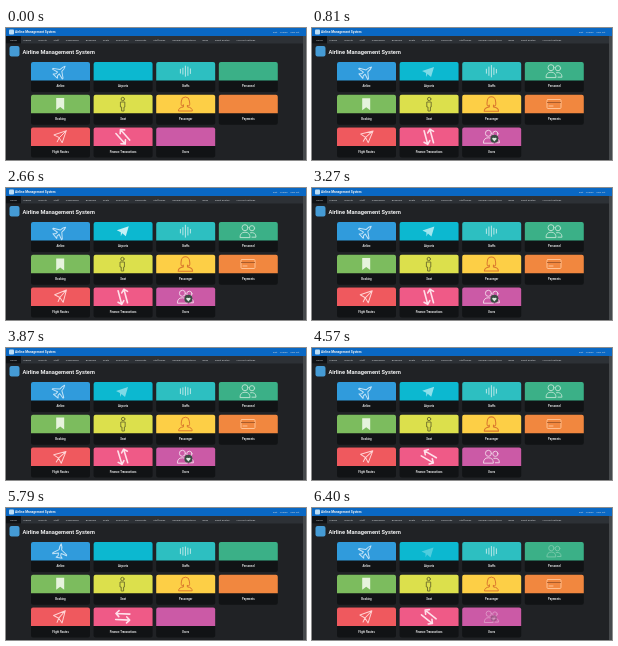
Animation, 300 px wide and 132 px high, one loop 6.5 s. Source, as an HTML page:

```html
<!DOCTYPE html>
<html lang="en">
<head>
<meta charset="utf-8">
<title>Airline Management System</title>
<style>
html, body { margin: 0; width: 100%; height: 100%; overflow: hidden; background: #202225; }
svg { display: block; width: 100vw; height: 100vh; }
text { font-family: Roboto, "Open Sans", sans-serif; fill: #d5d7da; }
.nav { font-size: 2.5px; }
.label { font-size: 2.8px; font-weight: 700; text-anchor: middle; fill: #e4e5e6; }
.heading { font-weight: 700; fill: #f0f1f2; }
.icon { fill: none; stroke-width: 1; stroke-linecap: round; stroke-linejoin: round; }
</style>
</head>
<body>
<svg viewBox="0 0 300 132" preserveAspectRatio="none">
  <rect width="300" height="132" fill="#202225"/>
  <rect width="300" height="8" fill="#0a68c4"/>
  <rect x="3" y="1.5" width="5" height="5" rx="1" fill="#b9dcf5"/>
  <text class="heading" x="9" y="5.2" font-size="3.2">Airline Management System</text>
  <text class="nav" x="267" y="5">Edit <tspan dx="2">Theme</tspan> <tspan dx="2">Sign out</tspan></text>
  <rect y="8" width="300" height="7.5" fill="#2d3136"/>
  <rect y="8" width="15" height="7.5" fill="#101215"/>
  <text class="nav" id="nav" x="4" y="12.9"></text>
  <rect x="297" y="8" width="3" height="124" fill="#46494c"/>
  <rect x="3.5" y="18" width="10" height="10.5" rx="2" fill="#459bd5"/>
  <text class="heading" x="16.4" y="25.6" font-size="5.7">Airline Management System</text>
  <g id="cards"></g>
</svg>
<script>
const LOOP = 6500;
const STEP = 101; // the picture advances about ten times a second
const REPLAY = 5800; // icons that draw themselves in start over after this

const NAV = ['Home', 'Planes', 'Airports', 'Staff', 'Passengers', 'Bookings', 'Seats', 'Food Menu',
  'Discounts', 'Staff Roles', 'General Transactions', 'Bags', 'Flight Routes', 'Account Settings'];

const PEOPLE = `<circle cx="-3" cy="-3.5" r="3"/><path d="M-8 6Q-8 1-3 1T2 6z"/>
  <circle cx="4" cy="-3" r="2.6"/><path d="M2.5 1.5Q8 .5 8 6H4"/>`;

const CARDS = [
  { label: 'Airline', color: '#309bdc', ink: '#c3e3f7', id: 'plane',
    art: '<path d="M0-7Q1.3-5 1.3-1L7 3V4L1.3 2.5V5L3 7H-3L-1.3 5V2.5L-7 4V3L-1.3-1Q-1.3-5 0-7z"/>' },
  { label: 'Airports', color: '#0cb8d0', ink: '#c6f1f6', id: 'glider',
    art: '<path fill="#c6f1f6" stroke="none" d="M-6-1L6-5L3 5L-.5 2L-2 5L-2 1z"/>' },
  { label: 'Staffs', color: '#2dbfc1', ink: '#b7e7e7', id: 'wave', art: '<path id="bars"/>' },
  { label: 'Personnel', color: '#3bb087', ink: '#b3e0cd', id: 'crew', art: PEOPLE },
  { label: 'Booking', color: '#7cbc5e', ink: '#e6f3dd', id: 'mark',
    art: '<path fill="#e6f3dd" stroke="none" d="M-4-6H4V6L0 3L-4 6z"/>' },
  { label: 'Seat', color: '#dce04c', ink: '#77772f', id: 'person',
    art: '<circle cy="-5" r="1.7"/><path d="M-2-2H2V3H1.2V7H-1.2V3H-2z"/>' },
  { label: 'Passenger', color: '#fdcf46', ink: '#d9772f', id: 'bust',
    art: '<path d="M-3 2Q-5 2-4-3A4 4 0 0 1 4-3Q5 2 3 2L2 1V3Q7 3.5 7 7H-7Q-7 3.5-2 3V1z"/>' },
  { label: 'Payments', color: '#f1873f', ink: '#ffc294', id: 'card',
    art: '<rect x="-7" y="-4.5" width="14" height="9" rx="1"/><path stroke="#a85c2c" d="M-6.5-1.5H6.5"/><path d="M-5 2H-1"/>' },
  { label: 'Flight Routes', color: '#ef595e', ink: '#ffd2d2', id: 'route',
    art: '<path d="M-6-2L6-6L2 6L-1 1zM6-6L-1 1L-3 5"/>' },
  { label: 'Finance Transactions', color: '#ef5a87', ink: '#ffe0ea', id: 'arrows',
    art: '<path stroke-width="1.6" d="M7-3H-7L-4-6M-7-3L-4 0M-7 3H7L4 0M7 3L4 6"/>' },
  { label: 'Users', color: '#cb5aa6', ink: '#f0d1e5', id: 'users',
    art: `${PEOPLE}<g id="badge" stroke="none"><circle cx="3" cy="2" r="4" fill="#394b42"/>
      <path fill="#d8eadb" d="M3 4.7L.8 2.2Q.7.2 3 1.2Q5.3.2 5.2 2.2z"/></g>` }
];

const byId = id => document.getElementById(id);

byId('nav').innerHTML = NAV.map((name, i) => `<tspan dx="${i && 6.8}">${name}</tspan>`).join('');

byId('cards').innerHTML = CARDS.map((card, i) => {
  const x = 25 + (i % 4) * 62.6, y = 34 + Math.floor(i / 4) * 32.8;
  return `<g transform="translate(${x} ${y})">
    <rect width="59" height="30" rx="2" fill="#111315"/>
    <path d="M0 18.5V2Q0 0 2 0H57Q59 0 59 2V18.5z" fill="${card.color}"/>
    <g transform="translate(29.2 9.2)"><g class="icon" id="${card.id}" stroke="${card.ink}">${card.art}</g></g>
    <text class="label" x="29.5" y="25.4">${card.label}</text></g>`;
}).join('');

function ramp(time, from, to) {
  const u = Math.min(1, Math.max(0, (time - from) / (to - from)));
  return u * u * (3 - 2 * u);
}

const pulse = (time, from, to, fade) => ramp(time, from, from + fade) - ramp(time, to, to + fade);

function pose(id, { x = 0, y = 0, turn = 0, scale = 1, alpha = 1 }) {
  const node = byId(id);
  node.setAttribute('transform', `translate(${x} ${y}) rotate(${turn}) scale(${scale})`);
  node.setAttribute('opacity', alpha);
}

function draw(time) {
  const swing = (cycles, shift = 0) => Math.sin(2 * Math.PI * (cycles * time / LOOP + shift));
  const replay = time % REPLAY;
  const appear = (id, from, to = 4500) => {
    const alpha = pulse(replay, from, to, 500);
    pose(id, { alpha, scale: .75 + .25 * alpha });
  };

  appear('crew', 300);
  appear('card', 100);
  appear('users', 300);
  appear('badge', 300, 4100);

  const shine = .8 + .2 * Math.cos(2 * Math.PI * (replay - 2500) / 3000);
  const glide = shine * pulse(replay, 300, 4500, 500);
  pose('glider', { alpha: glide, x: 2 * glide - 2, y: 2 - 2 * glide });

  pose('plane', { turn: 45 * (1 - pulse(time, 4500, 5500, 700)) + 6 * swing(3), y: .5 * swing(3) });
  pose('arrows', { turn: 75 * pulse((time + 900) % LOOP, 0, 4600, 1500) });
  pose('mark', { y: .4 * swing(3) });
  pose('person', { x: .4 * swing(2) });
  pose('bust', { scale: 1 + .03 * swing(3) });
  pose('route', { x: .6 * swing(3), y: -.4 * swing(3), turn: 4 * swing(2) });

  let bars = '';
  for (let x = -5; x <= 5; x += 2.5) {
    const h = (6 - .7 * Math.abs(x)) * (.85 + .15 * swing(3, x / 12));
    bars += `M${x} ${-h}V${h}`;
  }
  byId('bars').setAttribute('d', bars);
}

const start = performance.now();
function frame() {
  const time = (performance.now() - start) % LOOP;
  draw(Math.floor(time / STEP) * STEP);
  requestAnimationFrame(frame);
}
frame();
</script>
</body>
</html>
```
